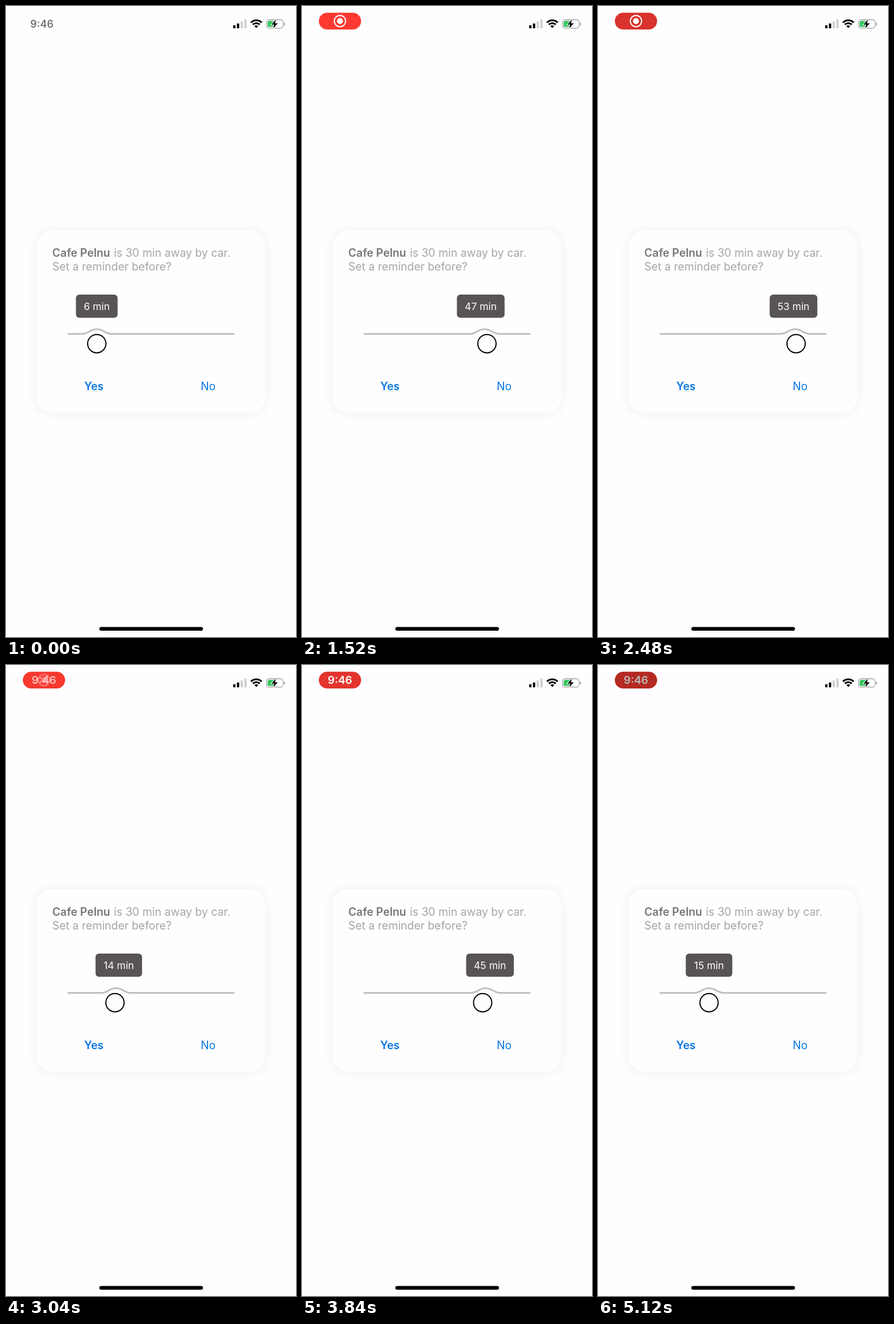
An HTML page that plays this animation: 508 by 1102 pixels, repeating every 5200 ms.

```html
<!DOCTYPE html>
<html lang="en">
<head>
<meta charset="utf-8">
<title>Reminder slider</title>
<style>
  html, body { margin: 0; width: 100%; height: 100%; overflow: hidden; background: #fefdff; }
  svg { display: block; width: 100%; height: 100%; }
  text { font-family: Inter, "Liberation Sans", sans-serif; font-size: 19.4px; }
  .bold { font-weight: 600; }
  .mid { text-anchor: middle; }
  .card { fill: #fefeff; filter: drop-shadow(0 0 9px rgba(40, 30, 50, .075)); }
</style>
</head>
<body>
<svg viewBox="0 0 508 1102">
  <rect width="508" height="1102" fill="#fefdff"/>

  <text id="clock" class="bold" x="42.5" y="37.5" style="font-size:18px">9:46</text>
  <g id="pill">
    <rect id="pillBg" x="29.5" y="11.7" width="74" height="29.3" rx="14.6"/>
    <g id="rec" fill="none" stroke="#fff" stroke-width="2">
      <circle cx="66.5" cy="26.3" r="9.9"/>
      <circle cx="66.5" cy="26.3" r="5.2" fill="#fff" stroke="none"/>
    </g>
    <text id="pillTime" class="bold mid" x="66.5" y="33.2" fill="#fff" style="font-size:19px">9:46</text>
    <rect id="press" x="29.5" y="11.7" width="74" height="29.3" rx="14.6"/>
  </g>

  <g id="signal">
    <rect x="398" y="33.5" width="4" height="5.5" rx="1"/>
    <rect x="404.5" y="30.5" width="4" height="8.5" rx="1"/>
    <rect x="411" y="27" width="4" height="12" rx="1" fill="#cfced1"/>
    <rect x="417.5" y="23.5" width="4" height="15.5" rx="1" fill="#cfced1"/>
  </g>
  <g id="wifi" fill="none" stroke="#000" stroke-width="3"></g>
  <g>
    <rect x="456.3" y="24" width="29.2" height="14.6" rx="4.6" fill="none" stroke="#a09fa2" stroke-width="1.3"/>
    <path d="M487 28.7q2 .6 2 2.6t-2 2.6z" fill="#a09fa2"/>
    <rect x="458.3" y="26" width="12.7" height="10.6" rx="2.6" fill="#34c65b"/>
    <path d="M472.8 23.8L465 32.4h4.8l-1.6 6.6 7.8-8.8h-4.8z" stroke="#fefdff" stroke-width="2" paint-order="stroke"/>
  </g>

  <rect class="card" x="54" y="391" width="400" height="320" rx="27"/>
  <text class="bold" x="81" y="438" fill="#77767a">Cafe Pelnu</text>
  <g fill="#a6a5a9">
    <text x="189" y="438">is 30 min away by car.</text>
    <text x="81" y="462">Set a reminder before?</text>
  </g>

  <path id="track" fill="none" stroke="#bdbcbf" stroke-width="2.8" stroke-linecap="round"/>
  <circle id="knob" cy="589.7" r="16" fill="#fefeff" stroke="#000" stroke-width="2"/>
  <rect id="tipBox" y="504" height="40.4" rx="6" fill="#575356"/>
  <text id="tipText" class="mid" y="530.6" fill="#fff" style="font-size:17.5px"></text>

  <g class="mid" fill="#0b78e3">
    <text class="bold" x="154" y="670.8">Yes</text>
    <text x="354" y="670.8">No</text>
  </g>
  <rect x="163.5" y="1084.5" width="181.5" height="6.5" rx="3.25"/>
</svg>
<script>
const LOOP = 5200, STEP = 80;
const $ = id => document.getElementById(id);
const set = (id, attrs) => {
  for (const k in attrs) $(id).setAttribute(k, attrs[k]);
};
const ramp = (t, a, b) => Math.min(1, Math.max(0, (t - a) / (b - a)));

// Drag path of the knob: time, x, velocity
const drag = [
  [820, 159, 0], [1520, 324, .2625], [1760, 368, 0], [2200, 318, 0],
  [2480, 347, .1], [2600, 353, 0], [3060, 190, 0], [3440, 331, .4375],
  [3580, 368, 0], [4300, 194.5, 0]
];

function knobX(t) {
  if (t <= drag[0][0]) return drag[0][1];
  const i = drag.findIndex(k => k[0] > t);
  if (i < 0) return drag[drag.length - 1][1];
  const [t0, x0, v0] = drag[i - 1], [t1, x1, v1] = drag[i];
  const d = t1 - t0, s = (t - t0) / d, q = 1 - s;
  return q * q * ((1 + 2 * s) * x0 + s * d * v0)
    + s * s * ((3 - 2 * s) * x1 - q * d * v1);
}

function drawWifi() {
  const cx = 438.5, cy = 38.6, a = 44 * Math.PI / 180;
  const arc = r => {
    const dx = r * Math.sin(a), y = cy - r * Math.cos(a);
    return `${cx - dx} ${y}A${r} ${r} 0 0 1 ${cx + dx} ${y}`;
  };
  $('wifi').innerHTML = `<path d="M${arc(13.6)}M${arc(8.7)}"/>`
    + `<path d="M${cx} ${cy}L${arc(4.9)}Z" fill="#000" stroke="none"/>`;
}

function drawSlider(t) {
  const x = knobX(t), bump = knobX(t - 15), tip = knobX(t - 40);
  const base = 572.7, top = 564.4;
  const label = String(Math.round((x - 135) / 4));
  const ones = label.split('1').length - 1;
  const w = 62.5 + 10.5 * label.length - 2 * ones;
  set('knob', { cx: x });
  set('track', {
    d: `M109 ${base}H${bump - 27}C${bump - 14} ${base} ${bump - 12} ${top} ${bump} ${top}`
      + `S${bump + 14} ${base} ${bump + 27} ${base}H399`
  });
  set('tipBox', { x: tip - w / 2, width: w });
  set('tipText', { x: tip });
  $('tipText').textContent = label + ' min';
}

function drawStatus(t) {
  const glow = (1 - Math.cos((t - 833) / 1640 * 2 * Math.PI)) / 2;
  const mix = (a, b) => Math.round(a + (b - a) * glow);
  const swap = ramp(t, 2880, 3120);
  set('clock', { opacity: .54 * (1 - ramp(t, 0, 200)) });
  set('pill', { opacity: ramp(t, 40, 320) });
  set('pillBg', { fill: `rgb(${mix(218, 255)},${mix(50, 59)},${mix(45, 49)})` });
  set('rec', { opacity: 1 - swap });
  set('pillTime', { opacity: swap });
  set('press', { opacity: .28 * ramp(t, 4900, 5120) });
}

function draw(now) {
  const t = Math.floor(now % LOOP / STEP) * STEP;
  drawSlider(t);
  drawStatus(t);
}

drawWifi();
draw(0);
let start;
requestAnimationFrame(function tick(now) {
  start ??= now;
  draw(now - start);
  requestAnimationFrame(tick);
});
</script>
</body>
</html>
```
